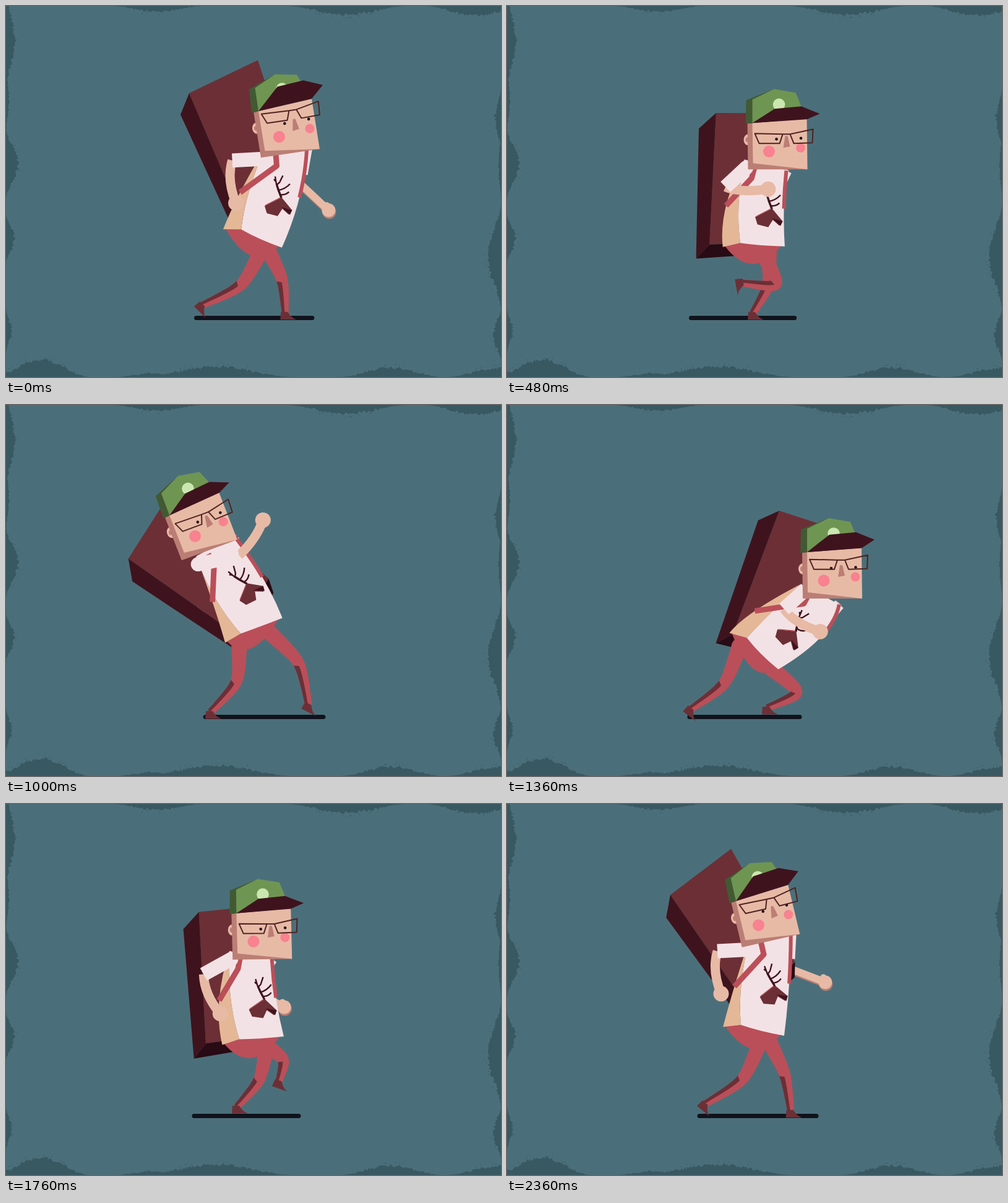
Recreate the animation shown at these times as an HTML page. Size 800 by 600 pixels, loop 2400 ms.

```html
<!DOCTYPE html>
<html lang="en">
<head>
<meta charset="utf-8">
<title>Walking with a heavy case</title>
<style>
html, body { margin: 0; width: 100%; height: 100%; overflow: hidden; background: #4b6f7a; }
svg { display: block; width: 100%; height: 100%; }
</style>
</head>
<body>
<svg id="stage" viewBox="0 0 800 600"></svg>
<script>
const LOOP = 2400, STEP = 1200, FRAME = 40;
const C = {
  edge: '#385862', ground: '#10131c', skin: '#e7baa6', shade: '#bb7e74', tan: '#e4b896',
  white: '#f3e2e5', red: '#ba4f59', maroon: '#6c2f36', dark: '#3f131d', deep: '#280b14',
  green: '#6f9553', moss: '#415a33', badge: '#cbe7b0', pink: '#f8828f', frame: '#4f2321', eye: '#1d0f12'
};

// ---------- drawing helpers ----------
const stage = document.getElementById('stage');
function add(parent, tag, attrs) {
  const el = document.createElementNS('http://www.w3.org/2000/svg', tag);
  for (const k in attrs) el.setAttribute(k, attrs[k]);
  parent.appendChild(el);
  return el;
}
const group = parent => add(parent, 'g', {});
const fill = (parent, color, d = '') => add(parent, 'path', { fill: color, d });
const line = (parent, color, width, d = '', cap = 'butt') =>
  add(parent, 'path', { fill: 'none', stroke: color, 'stroke-width': width, 'stroke-linecap': cap, 'stroke-linejoin': 'round', d });
const dot = (parent, color, cx, cy, r) => add(parent, 'circle', { fill: color, cx, cy, r });
const set = (el, d) => el.setAttribute('d', d);
const place = (el, x, y, a = 0) => el.setAttribute('transform', `translate(${x} ${y}) rotate(${a})`);
const poly = pts => 'M' + pts.map(p => p[0].toFixed(2) + ' ' + p[1].toFixed(2)).join('L');
function moveDot(el, [x, y]) {
  el.setAttribute('cx', x);
  el.setAttribute('cy', y);
}

// ---------- geometry ----------
const rad = a => a * Math.PI / 180;
const plus = (p, x, y) => [p[0] + x, p[1] + y];
const mid = (p, q) => [(p[0] + q[0]) / 2, (p[1] + q[1]) / 2];
const polar = (p, a, r) => plus(p, r * Math.cos(rad(a)), r * Math.sin(rad(a)));
const turned = (p, a, x, y) => polar(polar(p, a, x), a + 90, y);
const quadMid = (p, c, q) => mid(mid(p, c), mid(c, q));
const wave = (p, peak) => Math.cos(2 * Math.PI * (p - peak) / STEP);

// ---------- periodic key poses, smooth without overshoot ----------
function track(period, keys) {
  const times = Object.keys(keys).map(Number), rows = Object.values(keys), n = times.length;
  const at = i => times[(i + n) % n] + period * Math.floor(i / n);
  const row = i => rows[(i + n) % n];
  const slope = (i, c) => (row(i + 1)[c] - row(i)[c]) / (at(i + 1) - at(i));
  const tangent = (i, c) => {
    const a = slope(i - 1, c), b = slope(i, c);
    return a * b <= 0 ? 0 : 2 * a * b / (a + b);
  };
  return t => {
    t %= period;
    let i = n - 1;
    while (times[i] > t) i--;
    const h = at(i + 1) - at(i), u = (t - at(i)) / h, v = 1 - u;
    return rows[0].map((_, c) =>
      v * v * (1 + 2 * u) * row(i)[c] + u * u * (3 - 2 * u) * row(i + 1)[c] +
      h * u * v * (v * tangent(i, c) - u * tangent(i + 1, c)));
  };
}

// head x, y; case x, y; lean of the case; hip height; hip tilt
const bodyAt = track(STEP, {
  0: [408, 170, 296, 141, -22, 376, 24],
  160: [485, 238, 440, 171, 21.7, 402, 45],
  520: [384, 183, 324, 173.5, 1, 383, 0],
  720: [325, 157, 264, 186, -17, 356, -14],
  960: [257, 181, 193.5, 258.5, -55, 356.5, -23],
  1160: [370, 157, 264, 147, -33.5, 366, 14]
});
// hip shift; ankle x, y; knee bend; foot angle
const legAt = track(LOOP, {
  0: [2, 317, 484, 19, 45],
  160: [-37, 297, 492, 17, 38],
  480: [0, 380, 448, 46, 80],
  560: [8, 441, 449, 18, 20],
  940: [12, 493, 480, 20, 32],
  1180: [10, 455, 497, 8, 0],
  1360: [16, 420, 490, 44, 0],
  1680: [10, 397, 497, 12, 0],
  1760: [8, 373, 490, 13, 0],
  2120: [4, 342, 489, 16, 0],
  2200: [-36, 330, 497, 20, 0]
});
// upper arm angle, sleeve length, forearm angle
const nearArmAt = track(LOOP, {
  0: [177, 54, 85], 480: [137, 46, 3], 1000: [-12, 68, -56], 1160: [50, 50, 20],
  1360: [138, 41, 32], 1760: [151, 51, 67], 2120: [175, 49, 85]
});
// upper arm angle, forearm angle
const farArmAt = track(LOOP, {
  0: [100, 43], 480: [115, 110], 1000: [115, 110], 1360: [130, 150],
  1760: [125, 28], 2120: [32, -97], 2360: [93, 21]
});

// ---------- ragged border made of a few bumps: centre, half width, depth ----------
let seed = 11;
const rand = () => (seed = seed * 16807 % 2147483647) / 2147483647;
function ragged(length, bumps, map) {
  const pts = [[0, -4]];
  for (let s = 0; s <= length; s += 2) {
    const depth = Math.max(...bumps.map(([c, w, d]) =>
      Math.abs(s - c) < w ? d * Math.cos(Math.PI * (s - c) / (2 * w)) ** 2 : 0));
    const rough = Math.min(1, depth / 8);
    pts.push([s, depth + (rand() - 0.5) * 5 * rough]);
    if (rough > 0.8 && rand() < 0.12) moveDot(dot(stage, C.edge, 0, 0, 0.8), map([s, depth + 3 + rand() * 3]));
  }
  pts.push([length, -4]);
  fill(stage, C.edge, poly(pts.map(map)) + 'Z');
}
ragged(800, [[245, 75, 9], [550, 100, 14], [760, 85, 15]], p => p);
ragged(600, [[55, 85, 14], [150, 60, 5], [255, 60, 20], [376, 42, 13], [525, 38, 9]], p => [p[1], p[0]]);
ragged(600, [[182, 52, 10], [260, 60, 4], [406, 90, 21], [532, 46, 12]], p => [800 - p[1], p[0]]);
ragged(800, [[0, 40, 10], [57, 80, 28], [235, 60, 6], [340, 125, 17], [622, 85, 15], [795, 85, 14]], p => [p[0], 600 - p[1]]);

// ---------- figure, back to front ----------
const ground = line(stage, C.ground, 7, '', 'round');

const farArm = [C.shade, C.skin].map(color => {
  const g = group(stage);
  return { g, arm: line(g, color, 12), hand: dot(g, color, 0, 0, 11), thumb: dot(g, color, 0, 0, 5) };
});
place(farArm[1].g, -1, -3);

const box = group(stage);
fill(box, C.maroon, 'M0 0L123 -8L108 202L4 213Z');
fill(box, C.dark, 'M0 0L-26 27L-16 237L4 213Z');
fill(box, C.deep, 'M4 213L-16 237L94 222L108 202Z');
const farSleeve = line(stage, C.white, 18);

function makeLeg() {
  const g = group(stage);
  return {
    hip: dot(g, C.red, 0, 0, 13), skin: fill(g, C.red), stripe: fill(g, C.maroon),
    foot: fill(g, C.maroon, 'M-7 -2L4 -2Q9 7 18 10.5L-8 10.5Z')
  };
}
const farLeg = makeLeg();
const hips = fill(stage, C.red);
const nearLeg = makeLeg();

const side = fill(stage, C.tan);
const shirt = fill(stage, C.white);
const farStrap = line(stage, C.red, 6);
const nearStrap = line(stage, C.red, 9);

const deer = group(stage);
line(deer, C.dark, 3.4, 'M0 1L-7 -10L-12 -19');
line(deer, C.dark, 2.4, 'M-12 -18L-17 -31M-12 -18L-8 -23L-5 -35M-14 -23L-18 -26M-8 -10Q3 -14 9 -24M-3 -4Q5 -4 10 -11');
fill(deer, C.maroon, 'M-24 19L0 0L21 17L17 25L5 18L0 31L-18 30Z');
line(deer, C.red, 1.2, 'M-23 18L-2 1');
fill(deer, C.dark, 'M3 15L19 25L21 17L9 16Z');

const nearArm = line(stage, C.skin, 15);
const nearHand = dot(stage, C.skin, 0, 0, 12.5);
const sleeve = line(stage, C.white, 23);
const shoulder = dot(stage, C.white, 0, 0, 11.5);

const head = group(stage);
add(head, 'ellipse', { fill: C.skin, cx: -7, cy: 27, rx: 7, ry: 9 });
fill(head, C.shade, 'M-8 1L1 0L89 75L-7 75Z');
add(head, 'ellipse', { fill: C.shade, cx: -8, cy: 27, rx: 3, ry: 4 });
fill(head, C.skin, 'M0 0L88 -7L89 75L1 65Z');
fill(head, C.shade, 'M53 21L50 40L61 38L57 21Z');
dot(head, C.pink, 27, 46, 9.5);
dot(head, C.pink, 78, 40, 7.5);
dot(head, C.eye, 39, 26, 2.3);
dot(head, C.eye, 78.5, 24.5, 2.3);
const glasses = line(head, C.frame, 2, 'M3 17L48 18L43 33L10 33ZM48 18L60 18M60 18L97 10L96 32L66 33Z');
fill(head, C.moss, 'M-10 -37L35 -55L2 -36L1 0L-11 1Z');
fill(head, C.green, 'M0 -38L35 -55L70 -49L79 -27L40 -12L0 0Z');
dot(head, C.badge, 43, -30, 9.8);
const brim = fill(head, C.dark);

// ---------- posing ----------
// the knee is a rounded corner: a hyperbola added to the hip-ankle chord
function poseLeg(leg, t, hip, tilt) {
  const [shift, ax, ay, bend, turn] = legAt(t);
  const [hx, hy] = plus(hip, shift, 14 + shift * Math.sin(rad(tilt)));
  const dx = ax - hx, dy = ay - hy, len = Math.hypot(dx, dy);
  const soft = 0.07, root = s => Math.sqrt(s * s + soft);
  const point = u => {
    const k = bend * (root(1) - root(2 * u - 1)) / (root(1) - root(0)) / len;
    return [hx + dx * u + dy * k, hy + dy * u - dx * k];
  };
  const left = [], inner = [], right = [], N = 30;
  for (let i = 0; i <= N; i++) {
    const u = i / N, p = point(u), a = point(u - 0.01), b = point(u + 0.01);
    const angle = Math.atan2(b[1] - a[1], b[0] - a[0]) * 180 / Math.PI + 90;
    const w = 13 - 7.5 * u;
    left.push(polar(p, angle, w));
    inner.push(polar(p, angle, w * 0.15));
    right.push(polar(p, angle, -w));
  }
  set(leg.skin, poly([...left, ...right.reverse()]) + 'Z');
  set(leg.stripe, poly([...left.slice(N / 2), ...inner.slice(N / 2 + 1).reverse()]) + 'Z');
  moveDot(leg.hip, [hx, hy]);
  place(leg.foot, ax, ay, turn);
}

function draw(t) {
  const phase = t % STEP;
  const [headX, headY, caseX, caseY, lean, hipY, tilt] = bodyAt(t);
  const hip = [413, hipY];

  set(ground, `M${307.5 + 17 * wave(phase, 900)} 504.5H${486.5 + 27 * wave(phase, 960)}`);
  place(box, caseX, caseY, lean);

  // head; brim and glasses fly up as the body drops
  const nod = Math.min(0, lean * 0.38);
  const drop = (phase + 575) % STEP - 600;
  const flap = -12 * Math.exp(-((drop / 150) ** 2));
  place(head, headX, headY, nod);
  place(glasses, 1, flap);
  set(brim, poly([[0, 0], [36, -23 + flap], [79, -27 + flap], [109, -15 + flap], [88, -6 + flap * 0.1]]) + 'Z');

  // torso hangs between the collar below the head and the hem at the hips
  const roll = 12 + 0.75 * lean;
  const collar = plus(turned([headX, headY], nod, 41, 68), -20 - 1.55 * nod, 0);
  const neck = polar(collar, roll, -35), chest = polar(collar, roll, 35);
  const hem = polar(hip, tilt, 36), waist = polar(hip, tilt, -36);
  const tail = turned(waist, tilt * 0.7, -28, 8);
  const belly = plus(mid(chest, hem), 1.1 * Math.abs(tilt) - 10, 0);
  const flank = plus(mid(waist, neck), -12, 8);
  const spine = plus(mid(neck, tail), -14 - 0.7 * roll, 8);
  set(shirt, `M${neck}L${chest}Q${belly} ${hem}Q${plus(hip, -4, 2)} ${waist}Q${flank} ${neck}Z`);
  set(side, `M${neck}Q${spine} ${tail}L${waist}Q${flank} ${neck}Z`);

  const seat = plus(tail, 3, -2), center = mid(tail, hem);
  set(hips, `M${seat}L${waist}L${plus(center, 0, -22)}L${plus(hem, -5, -2)}Q${plus(center, -2, 58)} ${seat}Z`);
  poseLeg(nearLeg, t, hip, tilt);
  poseLeg(farLeg, t + STEP, hip, tilt);

  const strap = turned(collar, roll, -16, 6);
  set(nearStrap, poly([strap, turned(strap, roll, 0, 20), quadMid(neck, spine, tail)]));
  set(farStrap, `M${chest}Q${mid(chest, belly)} ${quadMid(chest, belly, hem)}`);
  const spin = 0.6 * (tilt + roll);
  place(deer, ...turned(mid(collar, hip), spin, 14, 3), spin);

  // arms swing from the shoulders
  const [upper, length, fore] = nearArmAt(t);
  const joint = plus(neck, 3, 13), cuff = polar(joint, upper, length);
  const hand = polar(cuff, fore, 69), elbow = polar(polar(cuff, upper, 12), fore, 30);
  set(sleeve, poly([joint, cuff]));
  moveDot(shoulder, joint);
  set(nearArm, `M${cuff}Q${elbow} ${hand}`);
  moveDot(nearHand, hand);

  const [farUpper, farFore] = farArmAt(t);
  const bend = polar(chest, farUpper, 62), palm = polar(bend, farFore, 64);
  set(farSleeve, poly([chest, polar(chest, farUpper, 44)]));
  for (const a of farArm) {
    set(a.arm, poly([chest, bend, palm]));
    moveDot(a.hand, palm);
    moveDot(a.thumb, plus(palm, -3, -8));
  }
}

const start = performance.now();
function tick() {
  const t = (performance.now() - start) % LOOP;
  draw(Math.floor(t / FRAME) * FRAME);
  requestAnimationFrame(tick);
}
tick();
</script>
</body>
</html>
```
